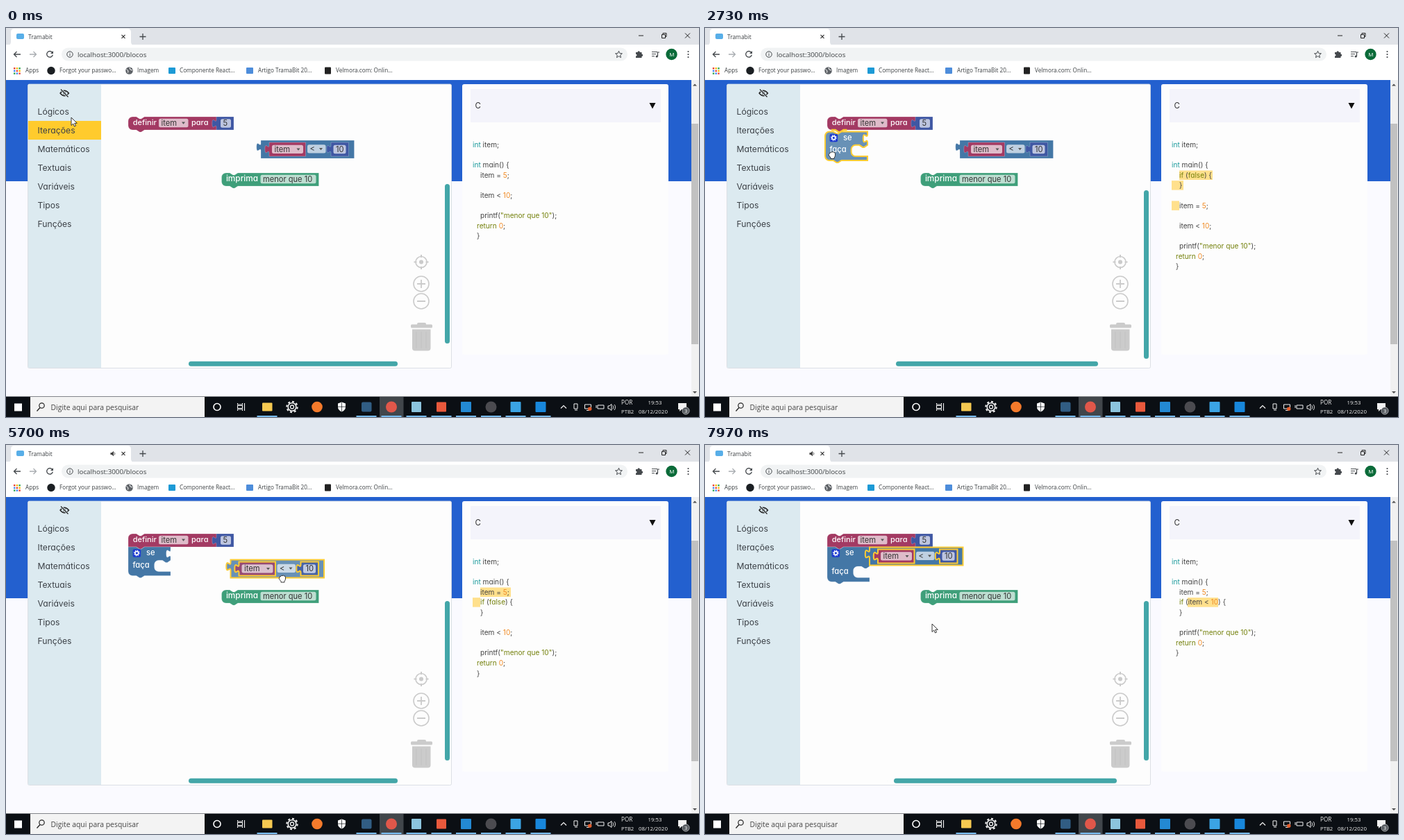
Write an HTML page that moves like this. It is 998 px wide and 561 px high and loops after 8 s.

```html
<!DOCTYPE html>
<html lang="pt">
<head>
<meta charset="utf-8">
<title>Blocos</title>
<style>
html, body { margin: 0; width: 100%; height: 100%; overflow: hidden; background: #fff; }
svg { display: block; width: 100vw; height: 100vh; }
text { white-space: pre; font-family: "Open Sans", "Noto Sans", sans-serif; }
.geo { font-family: Inter, "Noto Sans", sans-serif; font-feature-settings: "cv11"; }
.drag .body { fill-opacity: .8; }
</style>
</head>
<body>
<svg id="stage" viewBox="0 0 998 561" preserveAspectRatio="none"><g id="fixed"></g><g id="live"></g></svg>
<script>
const LOOP = 8000;
const LOGIC = '#4477a6', VAR = '#a33a63', MATH = '#3f57a3', TEXT = '#3f9f7a';
const YELLOW = '#fc3', TEAL = '#43a6a8', PANEL = '#dceaf0', GREY = '#cbcbcb';

// ---- drawing helpers ----
const esc = s => s.replace(/&/g, '&amp;').replace(/</g, '&lt;');
const rect = (x, y, w, h, fill, r = 0, extra = '') =>
  `<rect x="${x}" y="${y}" width="${w}" height="${h}" rx="${r}" fill="${fill}" ${extra}/>`;
const circle = (x, y, r, fill, extra = '') =>
  `<circle cx="${x}" cy="${y}" r="${r}" fill="${fill}" ${extra}/>`;
const fillPath = (d, fill) => `<path d="${d}" fill="${fill}"/>`;
const line = (d, color, w = 1) => `<path d="${d}" fill="none" stroke="${color}" stroke-width="${w}"/>`;
const ui = (x, y, s, size, fill = '#3c4043') =>
  `<text x="${x}" y="${y}" font-size="${size}" fill="${fill}">${esc(s)}</text>`;
const geo = (x, y, s, size, fill = '#333', weight = 400) =>
  `<text class="geo" x="${x}" y="${y}" font-size="${size}" fill="${fill}" font-weight="${weight}">${esc(s)}</text>`;
const at = (x, y, body, cls = '') => `<g class="${cls}" transform="translate(${x} ${y})">${body}</g>`;
const label = (x, y, s, size = 11.2) => geo(x, y, s, size, '#fff', 500);
const down = (x, y, c = '#555') => fillPath(`M${x} ${y}h5l-2.5 3.2z`, c);

// ---- block shapes ----
const NOTCH = 'l4.7 3.1h2.3l4.7 -3.1';
const NOTCH_BACK = 'l-4.7 3.1h-2.3l-4.7 -3.1';
const NOTCH_X = 11.7, NOTCH_END = 23.4, CORNER = 6.2;
const PLUG = 'c0 -7.8 -6.2 6.2 -6.2 -5.9s6.2 2 6.2 -5.8';
const SOCKET = 'c0 7.8 -6.2 -6.2 -6.2 5.9s6.2 -2 6.2 5.8';

const body = (d, fill, sel) =>
  `<path class="body" d="${d}" fill="${fill}" stroke="${sel ? YELLOW : 'rgba(255,255,255,.28)'}" stroke-width="${sel ? 2 : .8}"/>`;
const valuePath = (w, h, sockets = []) =>
  `M0 0H${w}${sockets.map(y => `V${y}${SOCKET}`).join('')}V${h}H0V15.6${PLUG}z`;

// top and bottom are the radii of the left corners; a joined corner is square
function stmtPath(w, h, top, bottom, right = '') {
  return `M0 ${top}A${top} ${top} 0 0 1 ${top} 0H${NOTCH_X}${NOTCH}H${w}${right}V${h}H${NOTCH_END}${NOTCH_BACK}` +
    `H${bottom}A${bottom} ${bottom} 0 0 1 0 ${h - bottom}z`;
}
const value = (w, h, fill, sel, sockets) => body(valuePath(w, h, sockets), fill, sel);
const slot = (x, y) => at(x, y, fillPath(valuePath(11.5, 18.5), '#eff4f7'));

function field(x, y, w, s, arrow, size = 11.2) {
  return rect(x, y, w, 12.4, 'rgba(255,255,255,.66)', 2.5) +
    geo(x + 3.5, y + 10, s, size) + (arrow ? down(x + w - 9.5, y + 4.8) : '');
}

const numBlock = (w, s, fx, h, sel) =>
  value(w, h, MATH, sel) + field(fx, (h - 12.4) / 2, w - fx - 4, s, false);

const setBlock = joined =>
  body(stmtPath(128, 19, CORNER, joined ? 0 : CORNER), VAR) + label(6.8, 12.4, 'definir', 11) +
  field(44, 2.8, 42.5, 'item', true) + label(91, 12.4, 'para', 11) +
  at(127, 0, numBlock(25, '5', 6, 19));

const printBlock = () =>
  body(stmtPath(140, 19, CORNER, CORNER), TEXT) + label(6.4, 12.4, 'imprima', 11.8) +
  field(56, 2.8, 80, 'menor que 10', false, 11.1);

const compareBlock = sel =>
  value(134.5, 26, LOGIC, sel) +
  at(12, 3, value(52.5, 20, VAR, sel) + field(4, 3.7, 45, 'item', true)) +
  field(67, 6.2, 26.5, '<', true) +
  at(101, 3, numBlock(25.5, '10', 3.5, 20, sel));

const gear = (x, y) =>
  rect(x, y, 11.5, 11.5, '#1d3bd0', 2) +
  circle(x + 5.75, y + 5.75, 2.4, 'none', 'stroke="#fff" stroke-width="1.5"') +
  circle(x + 5.75, y + 5.75, 3.7, 'none', 'stroke="#fff" stroke-width="1.3" stroke-dasharray="1.45 1.45"');

function ifBlock(sel, row = 19.3, joined = false) {
  const r = CORNER, end = row + 16.2, h = end + 6;
  const mouth = `V3.9${SOCKET}V${row}${NOTCH_BACK}h${r - NOTCH_X}` +
    `a${r} ${r} 0 0 0 ${-r} ${r}V${end - r}a${r} ${r} 0 0 0 ${r} ${r}H61`;
  return body(stmtPath(61, h, joined ? 0 : r, r, mouth), LOGIC, sel) +
    gear(6.6, 3.2) + label(26, 12.4, 'se') + label(6.4, row + 10.5, 'faça');
}

const pair = (w, op) => value(w, 25, LOGIC) + slot(9.5, 3.3) + field(24, 6, 28, op, true) + slot(w - 20, 3.3);

function flyout(pressed) {
  return rect(137, 81, 119.5, 409, PANEL, 0, 'opacity=".82"') +
    at(149, 89.5, ifBlock(pressed)) + at(149, 153, pair(78.5, '=')) + at(149, 197, pair(77, 'e')) +
    at(149, 240, value(41.5, 18.5, LOGIC, false, [2.6]) + label(6.5, 13, 'não')) +
    at(149, 276, value(85, 18.5, LOGIC) + field(3.5, 3, 77, 'verdadeiro', true, 11.4)) +
    at(149, 312.5, value(38, 18.5, LOGIC) + label(6.5, 12.8, 'nulo')) +
    at(149, 348, value(94, 55, LOGIC, false, [2.5, 21, 39.5]) +
      label(6.5, 13, 'teste') + label(6.5, 31.4, 'se verdadeiro') + label(6.5, 49.6, 'se falso'));
}

// ---- browser window, page and taskbar ----
function browser() {
  const ink = '#45494d';
  let s = rect(0, 0, 998, 25, '#e0e3e8') + rect(0, 24, 998, 51, '#fff') +
    fillPath('M2 25Q7 25 7 20V6Q7 1 12 1H175Q180 1 180 6V20Q180 25 185 25z', '#fff') +
    rect(15, 8, 11, 8, '#58aee8', 2) + ui(32, 15.6, 'Tramabit', 8.4) +
    line('M166.5 9.8l5 5m0 -5l-5 5', '#333', 1.2) + line('M192.5 12.5h9m-4.5 -4.5v9', ink, 1.3) +
    line('M911 11h7M978 7.5l7 7m0 -7l-7 7', '#222', 1) +
    line('M944.5 9.5h5v5h-5zM946 9.5v-2h5v5h-1.5', '#222', 1);
  s += line('M21 38h-9.5m4 -4l-4 4l4 4', ink, 1.3) + line('M34 38h9.5m-4 -4l4 4l-4 4', '#a9adb1', 1.3) +
    line('M66.5 35.2a4.3 4.3 0 1 0 .8 3.4', ink, 1.3) + fillPath('M68 33v4h-4z', ink) +
    rect(80, 28.5, 815, 19, '#f1f3f4', 9.5) +
    circle(92, 38, 4.2, 'none', `stroke="${ink}"`) + line('M92 37.3v3M92 35.4v1', ink, 1) +
    ui(103, 41.6, 'localhost:3000/blocos', 9.8) +
    line('M882.5 33.2l1.4 3.3 3.5.3 -2.7 2.3.8 3.5 -3 -1.9 -3 1.9.8 -3.5 -2.7 -2.3 3.5 -.3z', ink, 1) +
    fillPath('M907 35h2.5a1.7 1.7 0 0 1 3.4 0h2.6v2.6a1.7 1.7 0 0 1 0 3.4v2h-8.5v-2.5a1.5 1.5 0 0 0 0 -3z', ink) +
    line('M930 34.5h8M930 37.5h6M930 40.5h4M938.5 41v-6h2.5', ink, 1.2) + circle(937.2, 41, 1.6, ink) +
    circle(958.5, 38, 8.2, '#0b6b39') + ui(955.2, 41, 'M', 8, '#fff') +
    [34, 38, 42].map(y => circle(982.5, y, 1.1, ink)).join('');
  const dots = ['#e94335', '#fbbc05', '#34a853', '#4285f4'];
  for (let i = 0; i < 9; i++)
    s += rect(11 + i % 3 * 3.7, 57 + Math.floor(i / 3) * 3.7, 2.4, 2.4, dots[i % 4]);
  s += circle(65, 61.5, 5.7, '#1b1f23') + circle(177.5, 61.5, 5.3, '#5f6368') +
    line('M173.5 59.5q4 2 2 5M178 57q0 4 4 4', '#fff', 1) +
    rect(234, 57, 10, 9, '#1c9ad6', 1) + rect(346, 57, 10, 9, '#4d8ddb', 1) + rect(459, 56.5, 9, 10, '#222', 1);
  for (const [x, t] of [[28, 'Apps'], [77, 'Forgot your passwo...'], [189, 'Imagem'],
    [250, 'Componente React...'], [363, 'Artigo TramaBit 20...'], [475, 'Velmora.com: Onlin...']]) s += ui(x, 64.3, t, 8.2);
  return s;
}

function page() {
  let s = rect(0, 75, 998, 457, '#fafaff') + rect(0, 75, 987, 146, '#2360cf') +
    rect(31.5, 81, 610, 409.5, '#fdfdfd', 2, 'stroke="#d4d8df" stroke-width=".8"') +
    rect(657, 81, 297, 390, '#fdfdfd', 3) + rect(669, 88, 274, 48, '#f4f4fb') +
    geo(675.5, 116.3, 'C', 11.5) + fillPath('M926.5 108h9l-4.5 8.5z', '#111') +
    rect(987, 75, 11, 457, '#f1f1f1') + rect(987, 138, 10, 318, '#c1c1c1') +
    fillPath('M989 83.5h6l-3 -3zM989 524h6l-3 3z', '#505050');
  const ring = `stroke="${GREY}" stroke-width="1.6"`;
  s += circle(598, 337.5, 8, 'none', ring) + circle(598, 337.5, 3, GREY) +
    line('M598 327v4M598 344v4M587.5 337.5h4M604.5 337.5h4', GREY, 2) +
    circle(598, 369, 11, 'none', ring) + circle(598, 394, 11, 'none', ring) +
    line('M592 369h12M598 363v12M592 394h12', GREY, 1.8) +
    rect(583, 427.5, 31, 5, GREY, 1.5) + rect(592, 425, 13, 4, GREY, 2) +
    fillPath('M585 434.5h26.5v27q0 4 -4 4h-18.5q-4 0 -4 -4z', GREY) +
    line('M591 438v24M598 438v24M605 438v24', '#c1c1c1', 1);
  return s;
}

function taskbar() {
  const w = '#f2f2f2';
  let s = rect(0, 531.5, 998, 30, '#0b0f14') + rect(35, 532, 251, 29, '#f3f3f3') +
    rect(12, 541.5, 11, 11, '#fff') + circle(51.5, 544.5, 3.7, 'none', 'stroke="#222" stroke-width="1.2"') +
    line('M49 547.5l-4.5 5', '#222', 1.3) + ui(64.5, 550.5, 'Digite aqui para pesquisar', 10.4, '#444') +
    rect(538, 532, 34.5, 29, '#41464b') +
    circle(304, 546.5, 5, 'none', 'stroke="#fff" stroke-width="1.6"') +
    line('M333.5 541v2h7v-2M333.5 552v-2h7v2M333.5 544.5h7v4h-7zM343.5 541v11', w, 1.1) +
    rect(369, 540.5, 14.5, 12, '#f6c951', 1) +
    circle(412, 546.5, 5.8, 'none', `stroke="${w}" stroke-width="1.6"`) +
    circle(412, 546.5, 7.7, 'none', `stroke="${w}" stroke-width="2" stroke-dasharray="3 3"`) +
    circle(412, 546.5, 2.5, 'none', `stroke="${w}" stroke-width="1.3"`) +
    circle(448, 546.5, 7.8, '#f47a2b') +
    fillPath('M483.5 539.5l5.5 2v5q0 4.5 -5.5 7q-5.5 -2.5 -5.5 -7v-5z', '#fff') +
    line('M483.5 540v13M478 546.2h11', '#0b0f14', .7) +
    rect(512, 539.5, 14.5, 14, '#315d83', 2) + circle(555, 546.5, 8, '#e0574a') +
    rect(584, 539, 14, 15, '#8cc4dd', 1) + rect(620, 539.5, 14, 14, '#e9593c', 1) +
    rect(655, 539, 15, 15, '#2389d3', 1) + circle(698.5, 546.5, 8, '#4b4b50') +
    rect(726.5, 539, 15, 15, '#3ba4e4', 1) + rect(762.5, 539, 15, 15, '#1887db', 1);
  for (const x of [376, 519, 555, 591, 627, 662.5, 698.5, 734, 770]) s += rect(x - 14.5, 559, 29, 2, '#76b9ed');
  s += line('M799 548.5l4 -4l4 4', w, 1.2) +
    line('M818 542h5v7h-5zM819 551h4M833.5 543h9v6h-9zM836 551.5h4M852 544h9v5h-9zM850 544v4M867 545v4h2l3 2.5v-9l-3 2.5z', w, 1) +
    rect(838, 546.5, 5.5, 5.5, '#e05b2b', 3) + line('M874 544.5q2 2 0 5M876 543q3.2 3.5 0 8', w, .9) +
    ui(886, 543.4, 'POR', 8.2, w) + ui(886, 555.6, 'PTB2', 7.7, w) +
    ui(924.5, 543.4, '19:53', 7.8, w) + ui(911, 555.6, '08/12/2020', 7.9, w) +
    fillPath('M968 541h12v9h-7l-3 3v-3h-2z', w) + circle(979, 552, 5.2, '#575c61', 'stroke="#ddd" stroke-width=".6"') +
    ui(976.8, 555, '3', 8, '#fff');
  return s;
}

// ---- live parts ----
const SOUND = [[2860, 4650], [5280, 6180], [6820, LOOP]];
const ROWS = ['Lógicos', 'Iterações', 'Matemáticos', 'Textuais', 'Variáveis', 'Tipos', 'Funções'];
const OPEN = 560, PRESS = 1360, PULL = 1580, DROP = 2850, GRAB = 5000, LIFT = 5260, JOIN = 6780;

function toolbox(t) {
  const open = t >= OPEN && t < PULL;
  const hot = t < 120 ? 1 : t < PULL ? 0 : -1;
  let s = rect(32, 81, 105, 409, PANEL) +
    line('M78 94q6 -7.5 12.5 0q-6.5 7.5 -12.5 0z', '#222', 1.3) + circle(84.2, 94, 2.1, '#222') +
    line('M79 88.5l10.5 11', PANEL, 3) + line('M79 88.5l10.5 11', '#222', 1.2);
  ROWS.forEach((name, i) => {
    if (i === hot) s += rect(32, 107 + 27 * i, 105, 27, open ? '#ee7224' : '#ffcb2d');
    s += geo(45.5, 124.5 + 27 * i, name, 12.2, open && !i ? '#fff' : '#3d4248');
  });
  return s;
}

function scrollbars(t) {
  const [y, h, x, w] = t >= PULL && t < DROP ? [234, 243, 275, 291]
    : t >= JOIN + 120 ? [225, 230, 272, 321] : [225, 230, 263, 301];
  return rect(632, y, 7, h, TEAL, 3.5) + rect(x, 480.7, w, 7, TEAL, 3.5);
}

const TOKEN = /("[^"]*"|\bint\b|\b(?:if|return|false)\b|\b\d+\b)/;
const tokenColor = s => s === 'int' ? '#1b9a9c' : /^\d/.test(s) ? '#f08a24' : /^(if|return|false|")/.test(s) ? '#74810c' : '#444';
const paint = s => s.split(TOKEN).map(p => `<tspan fill="${tokenColor(p)}">${esc(p)}</tspan>`).join('');

function code(t) {
  const IF = ['if (false) {', '}'], SET = 'item = 5;', TEST = 'item < 10;';
  let lines, marks = [];
  if (t < PULL) lines = [SET, '', TEST];
  else if (t < DROP) {
    lines = [...IF, '', SET, '', TEST];
    marks = [[683, 0, 48], [672, 1, 17], [672, 3, 11]];
  } else if (t < JOIN) {
    lines = [SET, ...IF, '', TEST];
    marks = [[683, 0, 44], [672, 1, 11]];
  } else {
    lines = [SET, 'if (item < 10) {', '}'];
    marks = [[695, 1, 44]];
  }
  const inner = [...lines, '', 'printf("menor que 10");'].map(s => [683, s]);
  const all = [[672, 'int item;'], [672, ''], [672, 'int main() {'], ...inner, [678, 'return 0;'], [678, '}']];
  return marks.map(([x, row, w]) => rect(x, 205.5 + row * 14.63, w, 13.5, '#ffe08c')).join('') +
    all.map(([x, s], i) => `<text class="geo" x="${x}" y="${171.8 + i * 14.63}" font-size="10.15">${paint(s)}</text>`).join('');
}

// keys: [time, x, y], eased between neighbours
function follow(keys, t) {
  const i = keys.findIndex(k => k[0] > t);
  if (i < 0) return keys[keys.length - 1].slice(1);
  if (!i) return keys[0].slice(1);
  const [a, b] = [keys[i - 1], keys[i]];
  const p = (t - a[0]) / (b[0] - a[0]), e = p * p * (3 - 2 * p);
  return [a[1] + (b[1] - a[1]) * e, a[2] + (b[2] - a[2]) * e];
}

const POINTER = [[0, 94, 129], [350, 88, 121], [650, 88, 121], [1250, 158, 121], [PULL, 158, 121],
  [2450, 183, 183], [DROP, 183, 183], [3050, 190, 184], [4100, 443, 193], [4500, 443, 193], [4900, 446, 189],
  [LIFT, 445, 189], [5700, 398, 192.5], [6400, 327, 177.5], [JOIN, 322, 175], [7000, 322, 178], [7600, 327, 258]];
const IF_MOVE = [[PULL, 149, 89.5], [2450, 173, 149.5], [DROP, 173, 149.5]];
const CMP_MOVE = [[LIFT, 367, 162], [5700, 323.5, 165.5], [6400, 247, 151], [JOIN, 242, 149]];

function blocks(t) {
  let s = at(176, 128, setBlock(t >= DROP)) + at(310.5, 209, printBlock());
  const compare = at(...(t < JOIN ? follow(CMP_MOVE, t) : [237, 147.5]),
    compareBlock(t >= GRAB), t >= LIFT && t < JOIN ? 'drag' : '');
  if (t < PULL) return s + compare;
  if (t < DROP) {
    s += compare + at(...follow(IF_MOVE, t), ifBlock(true), 'drag');
    return t > 2250 ? s + line(`M182 147h5.7${NOTCH}h5`, YELLOW, 2.5) : s;
  }
  s += at(176, 147, ifBlock(t < GRAB, t < JOIN ? 19.3 : 28, true));
  if (t > 6150 && t < JOIN) s += line(`M237 148v2.9${SOCKET}v2`, YELLOW, 3);
  return s + compare;
}

function pointer(t) {
  const [x, y] = follow(POINTER, t);
  const closed = t >= PRESS && t < DROP || t >= GRAB && t < JOIN;
  const open = t >= 1150 && t < PRESS || t >= DROP && t < 3250 || t >= 4750 && t < GRAB || t >= JOIN && t < 7080;
  const shape = closed
    ? 'M-4 -1.5q0 -2 2 -1.7q.5 -1.5 2 -.8q1.5 -1 2.3 .3q2.2 -.3 2.2 2v2.2q0 2 -1.5 3.5v1.5h-5v-1.5l-2.5 -3q-.8 -1.7 .5 -2.5z'
    : open
      ? 'M-3 0v-4q1 -1.5 2 0v-1.5q1 -1.5 2 0v1q1 -1.2 2 .2v1.3q1.5 -1 1.8 .5v4q0 2 -1.5 4h-5l-3.3 -5q0 -1.5 2 -.5z'
      : 'M0 0V11.5L2.7 9L4.5 13L6.5 12L4.7 8.3H8.3z';
  return at(x, y, `<path d="${shape}" fill="#fff" stroke="#222" stroke-width=".9" stroke-linejoin="round"/>`);
}

const sound = t => SOUND.some(([a, b]) => t >= a && t < b)
  ? fillPath('M150.5 11v3h2l2.5 2.2v-7.4l-2.5 2.2z', '#444') + line('M156 10.5q1.7 2 0 4', '#444', .9) : '';

const live = document.getElementById('live');
document.getElementById('fixed').innerHTML = browser() + page() + taskbar();

function frame(now) {
  const t = now % LOOP;
  live.innerHTML = sound(t) + toolbox(t) + code(t) + blocks(t) +
    (t >= OPEN && t < PULL ? flyout(t >= PRESS) : '') + scrollbars(t) + pointer(t);
  requestAnimationFrame(frame);
}
frame(performance.now());
</script>
</body>
</html>
```
